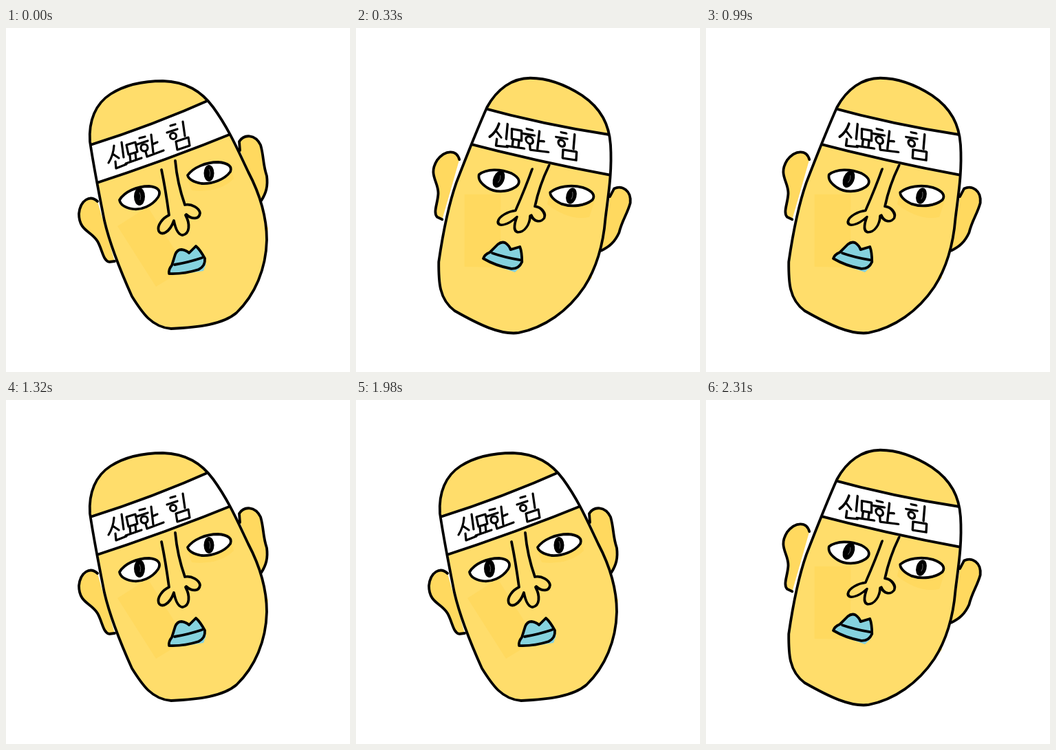
Recreate the animation shown at these times as an HTML page. Size 500 px wide and 500 px high, loop 2.64 s.

```html
<!DOCTYPE html>
<html lang="ko">
<head>
<meta charset="utf-8">
<title>신묘한 힘</title>
<style>
html, body { margin: 0; width: 100%; height: 100%; overflow: hidden; background: #fff; }
svg { display: block; width: 100vw; height: 100vh; }
.ink { fill: none; stroke: #000; stroke-width: 3.8; stroke-linecap: round; stroke-linejoin: round; }
.skin { fill: #ffdd6b; }
.shade { fill: #ffd95f; }
.white { fill: #fff; }
.lips { fill: #85d2de; }
.letters { stroke-width: 3.2; }
</style>
</head>
<body>
<!-- Each part is drawn leaning left; data-tilt moves it to the right-leaning pose. -->
<svg viewBox="0 0 500 500" role="img" aria-label="신묘한 힘">
  <defs>
    <path id="head" d="M122 165C120 135 130 110 152 96S203 77 228 77C262 78 284 92 301 115C325 148 338 180 352 209C372 247 379 280 379 308C378 350 362 388 335 414C315 431 280 435 240 437C212 435 198 414 183 390C165 350 150 310 143 280C137 250 128 205 122 165Z"/>
    <clipPath id="inside">
      <use href="#head" data-tilt="translate(176 -91.5) rotate(32.5) scale(1.01)"/>
    </clipPath>
  </defs>

  <path class="ink shade" data-tilt="translate(171 -93) rotate(32)"
    d="M133 252C122 242 108 250 106 270C106 295 124 295 133 310C140 322 141 338 150 340L158 339"/>
  <path class="ink shade" data-tilt="translate(175 -86) rotate(32)"
    d="M340 178L339 165C346 154 362 154 370 170C375 187 373 197 379 215C381 230 378 240 371 251"/>

  <g data-tilt="translate(176 -91.5) rotate(32.5) scale(1.01)">
    <path class="skin" d="M374 275L381 291 379 304 372 306Z"/>
    <use href="#head" class="skin"/>
    <path class="shade" d="M162 288L206 260 262 349 218 376Z"/>
    <path class="shade" d="M264 219Q295 190 325 195L331 219Q310 240 270 236Z"/>
  </g>
  <g clip-path="url(#inside)">
    <path class="ink white" data-tilt="translate(177 -91.8) rotate(32.5)"
      d="M110 174Q208 144 304 101L342 148Q232 193 120 229Z"/>
  </g>
  <use href="#head" class="ink" data-tilt="translate(176 -91.5) rotate(32.5) scale(1.01)"/>

  <g class="ink letters" data-tilt="matrix(1.018 .485 -.23 .934 87.5 -97)">
    <path d="M157 171Q156 185 149 196M155 183L164 189M168 166L171 188M159 194L160 204 175 198"/>
    <path d="M175 170L178 184 191 180 188 166ZM180 185L181 194M188 182L189 191M174 197L197 189"/>
    <path d="M194 160L202 158M191 169L206 164M211 155L214 181M213 169L220 166M203 180L205 187 229 178"/>
    <circle cx="201" cy="174" r="5"/>
    <path d="M239 142L246 140M234 152L249 147M257 136L260 157M247 165L249 177 267 171 265 159Z"/>
    <circle cx="243" cy="157" r="4.5"/>
  </g>

  <g data-tilt="translate(13 -25) rotate(23 195 246)">
    <path class="ink white" d="M165 250C172 238 190 230 208 230C222 231 226 238 221 246C212 259 196 265 184 263C172 261 166 256 165 250Z"/>
    <ellipse cx="194" cy="245" rx="8" ry="13"/>
    <path d="M194 239Q197 244 195 250" fill="none" stroke="#666"/>
  </g>
  <g data-tilt="translate(18 33) rotate(15 295 211)">
    <path class="ink white" d="M264 214C272 203 290 195 308 195C324 196 329 202 326 209C318 220 300 227 284 226C272 224 265 219 264 214Z"/>
    <ellipse cx="295" cy="211" rx="7.5" ry="12"/>
    <path d="M295 205Q298 210 296 216" fill="none" stroke="#666"/>
  </g>

  <path class="ink" data-tilt="matrix(.895 .293 -.518 .87 160.5 -40.5)"
    d="M226 206C230 225 234 250 237 272C228 276 219 287 222 295C226 303 238 297 244 280C246 290 250 301 257 301C267 299 268 285 261 272M246 193C248 215 254 240 260 257C270 255 281 262 282 269C281 278 271 279 262 271"/>

  <g data-tilt="translate(-52 -22) rotate(28 237 357)">
    <path class="lips" d="M280 342L291 342 287 353 268 356Z"/>
    <path class="ink lips" d="M237 357Q236 351 241 345L246 329Q249 322 255 322Q262 323 266 327L276 317Q282 322 289 335Q290 346 280 351Q258 358 237 357Z"/>
    <path class="ink" d="M245 344Q264 341 285 334"/>
  </g>
</svg>
<script>
const HOLD = 330;
const parts = document.querySelectorAll("[data-tilt]");
const start = performance.now();

function draw() {
  const tilted = Math.floor((performance.now() - start) / HOLD) % 2;
  for (const part of parts) part.setAttribute("transform", tilted ? part.dataset.tilt : "");
  requestAnimationFrame(draw);
}
draw();
</script>
</body>
</html>
```
